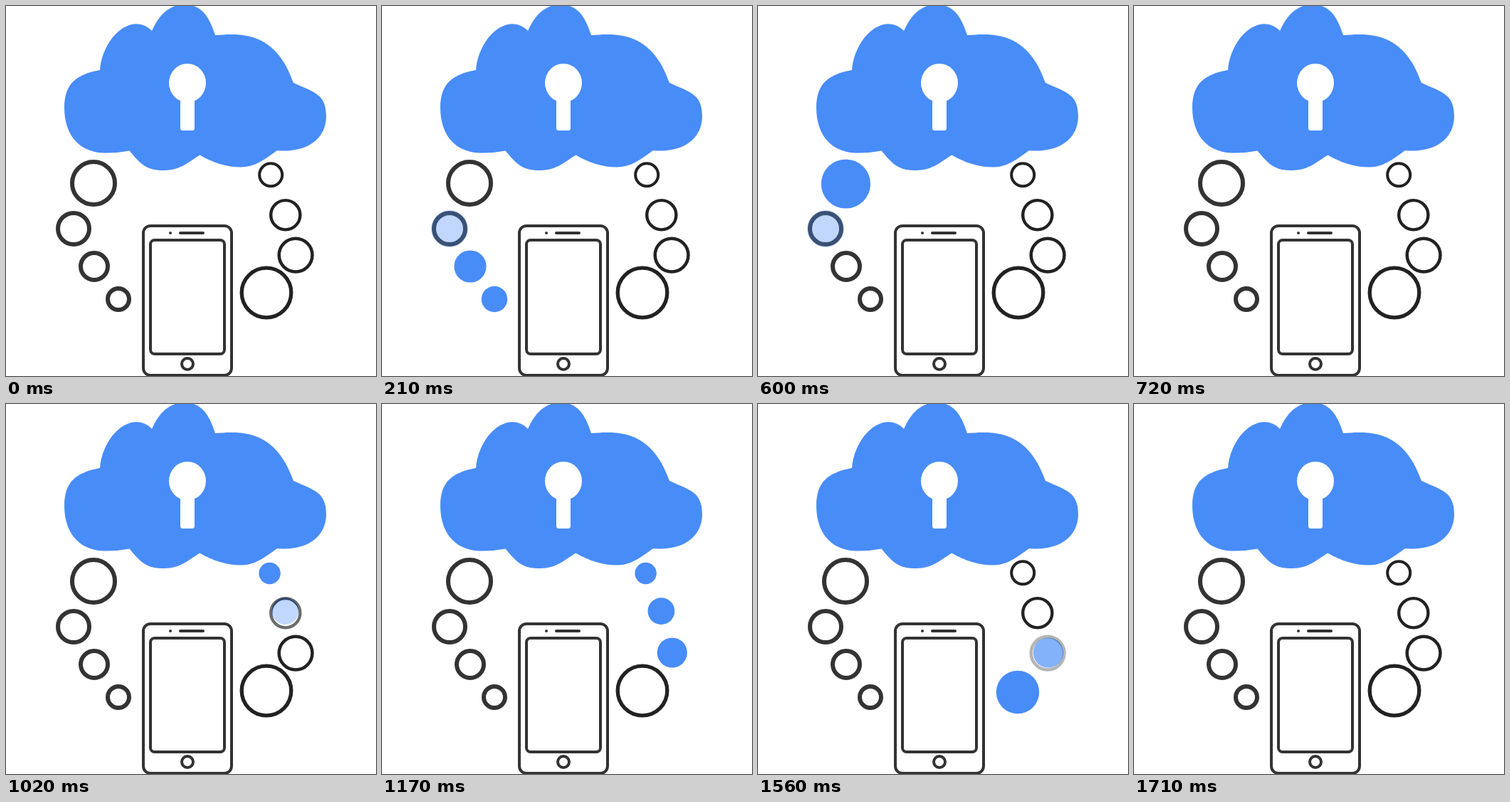
An HTML page that plays this animation: 520x520 px, repeating every 1.86 s.

```html
<!DOCTYPE html>
<html lang="en">
<head>
<meta charset="utf-8">
<title>Cloud sync</title>
<style>
  html, body { margin: 0; width: 100%; height: 100%; overflow: hidden; background: #fff; }
  svg { display: block; width: 100vw; height: 100vh; }
</style>
</head>
<body>
<svg viewBox="0 0 520 520">
  <path fill="#488cf8" d="M132 90C135 54 160 25.3 183 25.3Q196 25.3 205 35C214 14 229-2 250-2C274-2 285 13 294 41C325 39 378 32 404 108C432 121 450 123 450 155S422 207 381 203C362 217 349 226.5 330 226.5S291 220.5 272.5 209.5C255 220 245 231 221 231S189 222 173.5 203.5Q155 207 137 206.5C100 205 82 178 82 143S100 96 132 90Z"/>
  <ellipse cx="255" cy="108.2" rx="26" ry="27.2" fill="#fff"/>
  <rect x="245" y="120" width="20" height="55" rx="3.5" fill="#fff"/>
  <g fill="none" stroke="#333" stroke-width="4">
    <rect x="193" y="309" width="124" height="210" rx="10"/>
    <rect x="203" y="329" width="104" height="160" rx="6"/>
    <circle cx="255" cy="503" r="8"/>
    <path d="M245 319H277" stroke-linecap="round"/>
  </g>
  <circle cx="231" cy="319" r="2" fill="#333"/>
  <g id="bubbles"></g>
</svg>
<script>
const LOOP = 1860, STEP = 30, FADE = 3;
const BLUE = '#488cf8';
const layer = document.getElementById('bubbles');

function add(parent, tag, attrs = {}) {
  const el = document.createElementNS('http://www.w3.org/2000/svg', tag);
  for (const [name, value] of Object.entries(attrs)) el.setAttribute(name, value);
  return parent.appendChild(el);
}

// A white cover with a blue disc on top, which cross-fades over the ring.
function bubble(x, y, r, dx, dy, { color, stroke, disc }) {
  const width = stroke(r);
  add(layer, 'circle', { cx: x, cy: y, r, fill: 'none', stroke: color, 'stroke-width': width });
  const cover = add(layer, 'g', { opacity: 0 });
  add(cover, 'circle', { cx: x, cy: y, r: r + width / 2 + 1, fill: '#fff' });
  add(cover, 'circle', { cx: x + dx, cy: y + dy, r: disc(r), fill: BLUE });
  return cover;
}

// Bubbles are [x, y, radius, disc shift x, disc shift y] in order of filling.
const chains = [
  {
    fill: 1, empty: 13, color: '#333',
    stroke: () => 6,
    disc: r => 1.09 * r + 1.9,
    bubbles: [[158, 412, 15], [124, 366, 19], [95, 313, 22], [123, 249, 30, 0.4, 1]]
  },
  {
    fill: 31, empty: 46, color: '#222',
    stroke: r => 2.9 + 0.07 * r,
    disc: r => 0.8 * r + 2.4,
    bubbles: [
      [372.2, 237.3, 16, -1.6, 0.7],
      [392.8, 293.7, 20.6, -0.4, -2.6],
      [407.1, 350.1, 23.4, 0.7, -0.6],
      [366, 403, 34.8, -1, 2]
    ]
  }
];

for (const chain of chains) {
  chain.covers = chain.bubbles.map(([x, y, r, dx = 0, dy = 0]) => bubble(x, y, r, dx, dy, chain));
}

// Share of a fade done once the given step is reached.
const ramp = (step, start) => Math.min(1, Math.max(0, (step - start + 1) / FADE));

function draw(time) {
  const step = Math.floor((time % LOOP) / STEP);
  for (const { fill, empty, covers } of chains) {
    covers.forEach((cover, i) => {
      const wait = i * FADE;
      cover.setAttribute('opacity', ramp(step, fill + wait) - ramp(step, empty + wait));
    });
  }
}

let begin;
function tick(now) {
  begin ??= now;
  draw(now - begin);
  requestAnimationFrame(tick);
}
draw(0);
requestAnimationFrame(tick);
</script>
</body>
</html>
```
